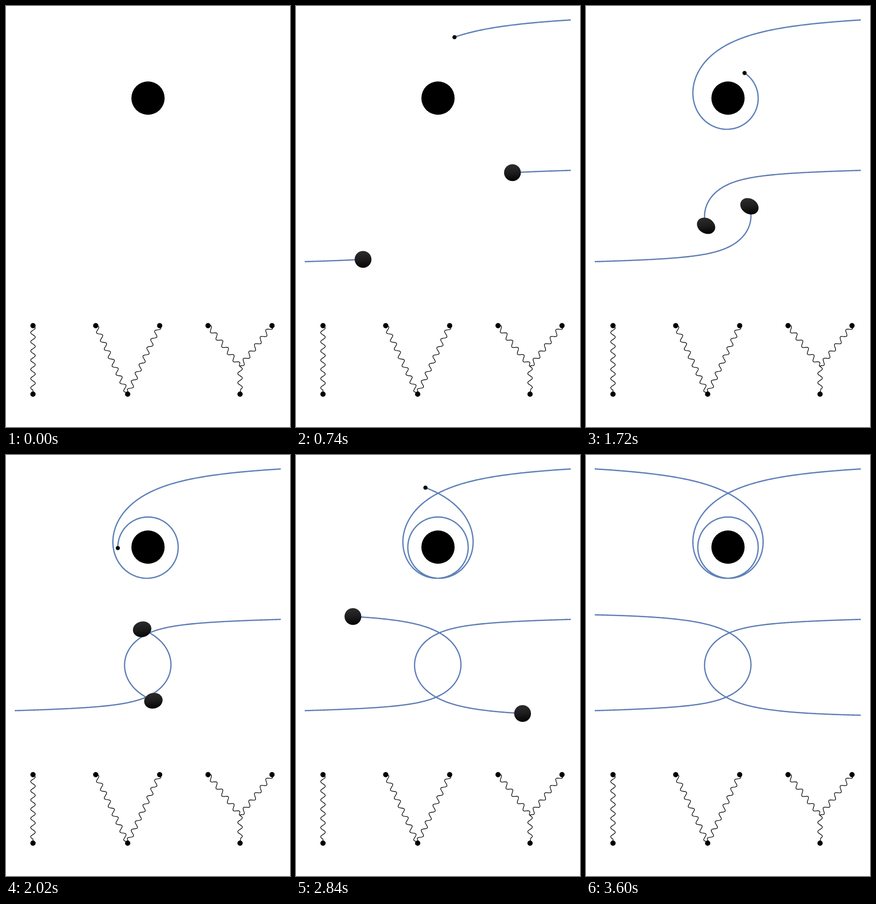
These frames come from a looping animation (584x864 px, 3620 ms). An HTML page with a canvas:

```html
<!DOCTYPE html>
<html lang="en">
<head>
<meta charset="utf-8">
<title>Scattering orbits</title>
<style>
  html, body { margin: 0; width: 100%; height: 100%; overflow: hidden; background: #fff; }
  canvas { display: block; }
</style>
</head>
<body>
<canvas id="stage" width="584" height="864"></canvas>
<script>
const ctx = document.getElementById('stage').getContext('2d');
const LOOP = 3620, START = 140, TICK = 20;
const T0 = 100, STEP = 10; // sampling of the precomputed paths
const TAU = Math.PI * 2, RAD = Math.PI / 180;
const D = 0.001; // integration step in radians

// Relativistic orbit from its closest point: u'' = h + 3mu^2 - u, with u = 1/r
function integrate({ r0, m, lapse }, h, rEnd) {
  const rows = [], uEnd = 1 / rEnd;
  const acc = u => h + 3 * m * u * u - u;
  const slowness = u => 1 / (u * u * (1 - lapse * u));
  let u = 1 / r0, v = 0, phi = 0, t = 0;
  while (u > uEnd && phi < 10) {
    rows.push({ phi, r: 1 / u, t });
    const before = slowness(u);
    v += acc(u) * D / 2;
    u += v * D;
    v += acc(u) * D / 2;
    phi += D;
    t += (before + slowness(u)) / 2 * D;
  }
  return rows;
}

// Half an orbit that passes distance exit.r at exit.deg past the closest
// point, timed to reach clock.deg after clock.ms
function halfOrbit(spec) {
  const { r0, m, exit, clock } = spec, u0 = 1 / r0;
  let lo = 0, hi = u0 - 3 * m * u0 * u0;
  for (let i = 0; i < 40; i++) {
    const h = (lo + hi) / 2;
    if (integrate(spec, h, exit.r).length * D < exit.deg * RAD) lo = h; else hi = h;
  }
  const rows = integrate(spec, lo, 420);
  const scale = clock.ms / rows[Math.round(clock.deg * RAD / D)].t;
  rows.forEach(row => row.t *= scale);
  return age => {
    let i = rows.findIndex(row => row.t > age);
    if (i < 0) i = rows.length - 1;
    const a = rows[i - 1], b = rows[i], k = (age - a.t) / (b.t - a.t);
    return { r: a.r + (b.r - a.r) * k, phi: a.phi + (b.phi - a.phi) * k };
  };
}

// Positions of a body that is closest to the centre at time mid, at angle axis
function track({ x, y, mid, axis, inward, outward }) {
  return Array.from({ length: (LOOP - T0) / STEP + 1 }, (_, i) => {
    const age = T0 + i * STEP - mid;
    const { r, phi } = age < 0 ? inward(-age) : outward(age);
    const angle = axis * RAD + (age < 0 ? -phi : phi);
    return [x + r * Math.cos(angle), y - r * Math.sin(angle)];
  });
}

const hole = { x: 292, y: 189, r: 34.2 };
const whirl = halfOrbit({
  r0: 61.7, m: hole.r / 2, lapse: hole.r,
  exit: { r: 316.7, deg: 419.6 }, clock: { deg: 375.2, ms: 1060 }
});
const particlePath = track({ ...hole, mid: 1800, axis: 90, inward: whirl, outward: whirl });

// The pair loses energy in the encounter, so it leaves more slowly
const starPath = track({
  x: 291.5, y: 431, mid: 1647, axis: 178.7,
  inward: halfOrbit({
    r0: 47.7, m: 10, lapse: 10,
    exit: { r: 289.1, deg: 159.8 }, clock: { deg: 148.6, ms: 907 }
  }),
  outward: halfOrbit({
    r0: 47.7, m: 8.2, lapse: 8.2,
    exit: { r: 292.2, deg: 160.7 }, clock: { deg: 151.6, ms: 1193 }
  })
});
const twinPath = starPath.map(([x, y]) => [583 - x, 862 - y]);

// Tidal bulge: quick rise, slow decay, turning steadily
function tide(t) {
  const d = t - 1690;
  return {
    stretch: 0.135 * Math.exp(-((d / (d < 0 ? 300 : 630)) ** 2)),
    angle: (-145 - 0.15 * d) * RAD
  };
}

function disc(x, y, r) {
  ctx.fillStyle = '#000';
  ctx.beginPath();
  ctx.arc(x, y, r, 0, TAU);
  ctx.fill();
}

function line(points, color, width) {
  ctx.strokeStyle = color;
  ctx.lineWidth = width;
  ctx.lineJoin = 'round';
  ctx.beginPath();
  points.forEach(([x, y]) => ctx.lineTo(x, y));
  ctx.stroke();
}

// Photon line: whole half-waves, then straight to the end
function wave([x0, y0], [x1, y1]) {
  const length = 18.9, height = 4.7;
  const dist = Math.hypot(x1 - x0, y1 - y0);
  const cx = (x1 - x0) / dist, cy = (y1 - y0) / dist;
  const end = Math.floor(2 * dist / length) / 2 * length;
  const points = [];
  for (let s = 0; s <= end; s += length / 20) {
    const a = height * Math.sin(TAU * s / length);
    points.push([x0 + cx * s + cy * a, y0 + cy * s - cx * a]);
  }
  points.push([x1, y1]);
  line(points, '#000', 1.35);
}

function diagram(tops, joint, foot) {
  for (const top of tops) wave(top, joint);
  if (foot !== joint) wave(joint, foot);
  for (const [x, y] of [...tops, foot]) disc(x, y, 5.4);
}

function diagrams() {
  const top = x => [x, 656], foot = x => [x, 796.5];
  const vFoot = foot(250.2);
  diagram([top(55.5)], foot(55.5), foot(55.5));
  diagram([top(184.5), top(316)], vFoot, vFoot);
  diagram([top(415.5), top(547)], [481.3, 740], foot(481.3));
}

function body([x, y], { stretch, angle }) {
  const r = 17.3;
  const shade = ctx.createLinearGradient(x - 2, y - r, x + 2, y + r);
  shade.addColorStop(0, '#2d2d2d');
  shade.addColorStop(0.5, '#1d1d1d');
  shade.addColorStop(1, '#020202');
  ctx.fillStyle = shade;
  ctx.beginPath();
  ctx.ellipse(x, y, r * Math.exp(stretch), r * Math.exp(-0.75 * stretch), angle, 0, TAU);
  ctx.fill();
}

function draw(t) {
  ctx.fillStyle = '#fff';
  ctx.fillRect(0, 0, 584, 864);
  diagrams();
  disc(hole.x, hole.y, hole.r);
  if (t < START) return;

  const n = (t - T0) / STEP, pair = [starPath, twinPath];
  ctx.save();
  ctx.beginPath();
  ctx.rect(18, 0, 547, 600);
  ctx.clip();
  line(particlePath.slice(0, n + 1), '#5e82b8', 2.7);
  disc(...particlePath[n], 4.3);
  for (const path of pair) line(path.slice(0, n + 1), '#5f7db5', 2.6);
  for (const path of pair) body(path[n], tide(t));
  ctx.restore();
}

const begin = performance.now();
function frame() {
  const t = (performance.now() - begin) % LOOP;
  draw(Math.floor(t / TICK) * TICK);
  requestAnimationFrame(frame);
}
frame();
</script>
</body>
</html>
```
